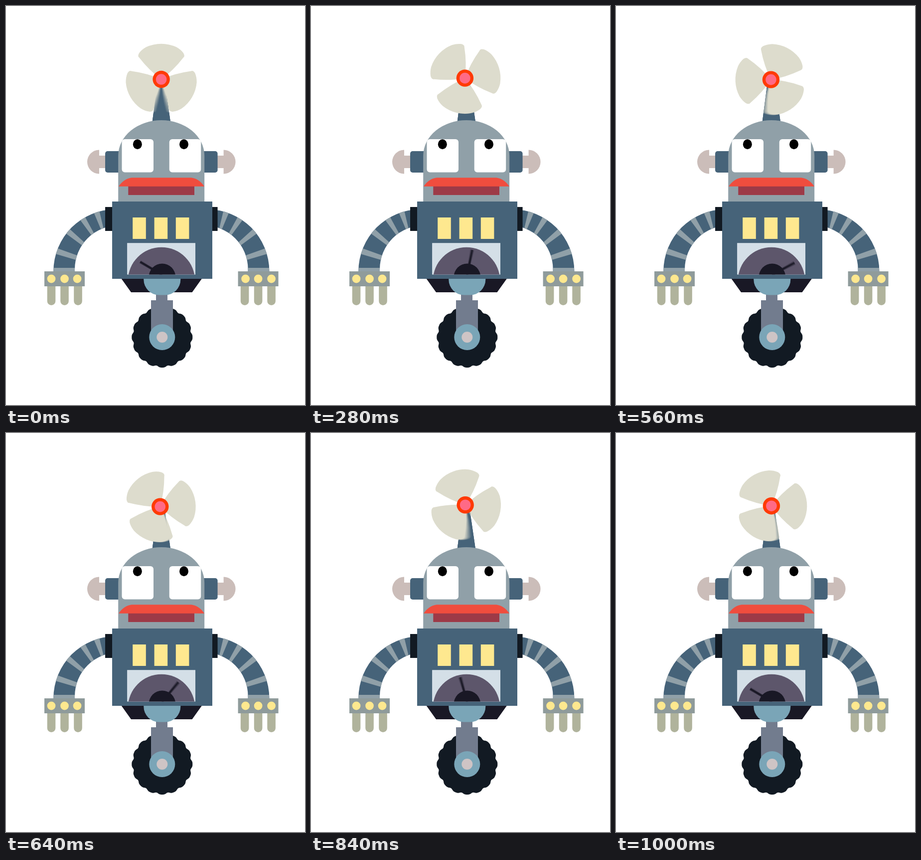
Animation, 600 px wide and 800 px high, one loop 1.04 s. Source, as an HTML page with a canvas:

```html
<!DOCTYPE html>
<html lang="en">
<head>
<meta charset="utf-8">
<title>Robot</title>
<style>
html, body { margin: 0; width: 100%; height: 100%; overflow: hidden; background: #fff; }
canvas { display: block; width: 600px; height: 800px; }
</style>
</head>
<body>
<canvas id="stage" width="600" height="800"></canvas>
<script>
const ctx = document.getElementById('stage').getContext('2d');
const layer = document.createElement('canvas');
layer.width = 600;
layer.height = 800;
const lay = layer.getContext('2d');

const STEP = 40, FRAMES = 26, SAMPLES = 10, SHUTTER = 0.5, TURN = 27.64;
const RAD = Math.PI / 180;
const C = {
  steel: '#466379', grey: '#90a0a8', dark: '#121a23', ink: '#191825',
  yellow: '#fee88f', teal: '#7aa5b7', blade: '#dddccd', pink: '#cbbdb9'
};

function rect(c, color, x0, y0, x1, y1, r = 0) {
  c.fillStyle = color;
  c.beginPath();
  c.roundRect(x0, y0, x1 - x0, y1 - y0, r);
  c.fill();
}

function oval(c, color, x, y, rx, ry = rx) {
  c.fillStyle = color;
  c.beginPath();
  c.ellipse(x, y, rx, ry, 0, 0, 2 * Math.PI);
  c.fill();
}

function poly(c, color, pts) {
  c.fillStyle = color;
  c.beginPath();
  pts.forEach(p => c.lineTo(p[0], p[1]));
  c.closePath();
  c.fill();
}

function mirrored(paint) {
  paint();
  ctx.save();
  ctx.translate(623.6, 0);
  ctx.scale(-1, 1);
  paint();
  ctx.restore();
}

// Averages several moments inside one exposure.
function blurred(frame, paint) {
  for (let k = 0; k < SAMPLES; k++) {
    lay.clearRect(0, 0, 600, 800);
    paint(frame + ((k + 0.5) / SAMPLES - 0.5) * SHUTTER);
    ctx.globalAlpha = 1 / (k + 1);
    ctx.drawImage(layer, 0, 0);
  }
  ctx.globalAlpha = 1;
}

function arm() {
  ctx.save();
  ctx.beginPath();
  ctx.rect(80, 390, 120, 143);
  ctx.clip();
  // tapered tube between two circles
  ctx.beginPath();
  ctx.arc(219.5, 532, 124.3, 0, 2 * Math.PI);
  ctx.moveTo(314, 528);
  ctx.arc(226, 528, 88, 0, 2 * Math.PI);
  ctx.clip('evenodd');
  rect(ctx, C.steel, 80, 390, 200, 533);
  rect(ctx, C.grey, 80, 525, 200, 533);
  // stripes, by angle leftwards from straight up
  const at = (a, r) => [220 - r * Math.sin(a * RAD), 530 - r * Math.cos(a * RAD)];
  for (const a of [18, 32.5, 50.8, 72]) {
    const w = 1 + a / 32;
    poly(ctx, C.grey, [at(a - 2.7, 126), at(a + 2.7, 126), at(a + w, 80), at(a - w, 80)]);
  }
  ctx.restore();
}

function side() {
  // ear
  ctx.fillStyle = C.pink;
  ctx.beginPath();
  ctx.arc(187, 312.5, 24, Math.PI / 2, Math.PI * 1.5);
  ctx.fill();
  rect(ctx, C.pink, 186, 300, 200, 325);
  rect(ctx, C.steel, 199, 291, 228, 334, [5, 0, 0, 5]);

  arm();
  rect(ctx, C.dark, 199, 403, 214, 451);

  // hand
  for (const x of [91, 117.5, 144.5]) rect(ctx, '#b0b39c', x - 8.3, 558, x + 8.3, 600, [0, 0, 8.3, 8.3]);
  rect(ctx, '#8f9b9b', 77, 532, 158, 562);
  for (const x of [91, 117.5, 143]) oval(ctx, C.yellow, x, 547, 8.4);
}

function wheel() {
  ctx.fillStyle = C.dark;
  ctx.beginPath();
  for (let a = 0; a < 360; a += 1) {
    const r = 61 - 3 * Math.sin(a * 8 * RAD) ** 4;
    ctx.lineTo(313.3 + r * Math.cos(a * RAD), 664 + r * Math.sin(a * RAD));
  }
  ctx.fill();
  rect(ctx, '#727c8e', 301, 572, 324, 592);
  rect(ctx, '#727c8e', 291, 590, 335, 662);
  oval(ctx, C.teal, 313.3, 664, 26);
  oval(ctx, '#cec4c5', 313.3, 664, 11);
}

function head() {
  ctx.fillStyle = C.grey;
  ctx.beginPath();
  ctx.ellipse(311.7, 300, 86.5, 71, 0, Math.PI, 0);
  ctx.lineTo(398.2, 393);
  ctx.lineTo(225.2, 393);
  ctx.fill();
  for (const x of [232.5, 327.7]) rect(ctx, '#fff', x, 267, x + 63.5, 333.5, 6);
  oval(ctx, '#000', 263.8, 277.3, 9, 10);
  oval(ctx, '#000', 357, 277.3, 9, 10);

  rect(ctx, '#9d3a47', 245.3, 360, 378, 379);
  ctx.fillStyle = '#f04d3e';
  ctx.beginPath();
  ctx.moveTo(226, 361.7);
  ctx.quadraticCurveTo(237, 346, 252, 344.3);
  ctx.lineTo(372, 344.3);
  ctx.quadraticCurveTo(387, 346, 398, 361.7);
  ctx.fill();
}

function body() {
  poly(ctx, C.ink, [[231, 546], [393.5, 546], [373.5, 574], [251, 574]]);
  rect(ctx, C.teal, 276.3, 546, 350.3, 579.5, [0, 0, 31, 31]);
  rect(ctx, C.steel, 213, 392, 414, 547);
  for (const x of [254.2, 297.6, 340.8]) rect(ctx, C.yellow, x, 424, x + 26.6, 467);
}

// Swings up for 13 steps and back for 12.
function needleAngle(f) {
  f = Math.max(0, Math.min(25, f));
  return f < 13 ? -60 + 133 * f / 13 : 73 - 133 * (f - 13) / 12;
}

function gauge(f) {
  rect(lay, '#d4dfe7', 243.3, 475.5, 380, 538.3);
  lay.save();
  lay.beginPath();
  lay.rect(243, 475, 138, 63.3);
  lay.clip();
  oval(lay, '#5d566b', 312, 551, 67.3);
  lay.save();
  lay.translate(313.2, 539);
  lay.rotate(needleAngle(f) * RAD);
  rect(lay, C.ink, -2.2, -51, 2.2, 0);
  lay.restore();
  oval(lay, C.ink, 313.4, 543.3, 26.8);
  lay.restore();
}

// Two turns per loop around a point slightly off the hub.
function fanPose(f) {
  const turn = f * TURN;
  const a = (turn + 35) * RAD;
  return { turn, x: 310.1 + 1.8 * Math.cos(a), y: 146 + 1.8 * Math.sin(a) };
}

function blades(c, f) {
  const p = fanPose(f);
  const at = (a, r) => [r * Math.sin(a * RAD), -r * Math.cos(a * RAD)];
  c.fillStyle = C.blade;
  for (let i = 0; i < 3; i++) {
    c.save();
    c.translate(p.x, p.y);
    c.rotate((p.turn + i * 120) * RAD);
    c.beginPath();
    c.moveTo(0, 0);
    c.quadraticCurveTo(...at(-54, 30), ...at(-45.5, 62));
    c.quadraticCurveTo(...at(-46, 67), ...at(-40, 69));
    c.quadraticCurveTo(...at(-33, 71.4), ...at(-25, 71.4));
    c.arc(0, 0, 71.4, -115 * RAD, -65 * RAD);
    c.quadraticCurveTo(...at(33, 71.4), ...at(40, 69));
    c.quadraticCurveTo(...at(46, 67), ...at(45.5, 62));
    c.quadraticCurveTo(...at(54, 30), 0, 0);
    c.fill();
    c.restore();
  }
}

function mast(f) {
  poly(lay, C.steel, [[304.8, 147], [317.5, 147], [329.8, 231], [293.8, 231]]);
  lay.globalCompositeOperation = 'source-atop';
  blades(lay, f);
  lay.globalCompositeOperation = 'source-over';
}

function draw(f) {
  ctx.fillStyle = '#fff';
  ctx.fillRect(0, 0, 600, 800);
  blades(ctx, f);
  blurred(f, mast);
  const hub = fanPose(f);
  oval(ctx, '#ff3a05', hub.x, hub.y, 17.2);
  oval(ctx, '#ff6a86', hub.x, hub.y, 10.8);

  mirrored(side);
  wheel();
  head();
  body();
  blurred(f, gauge);
}

const start = performance.now();
let last = -1;
function tick() {
  const f = Math.floor((performance.now() - start) / STEP) % FRAMES;
  if (f !== last) draw(last = f);
  requestAnimationFrame(tick);
}
tick();
</script>
</body>
</html>
```
